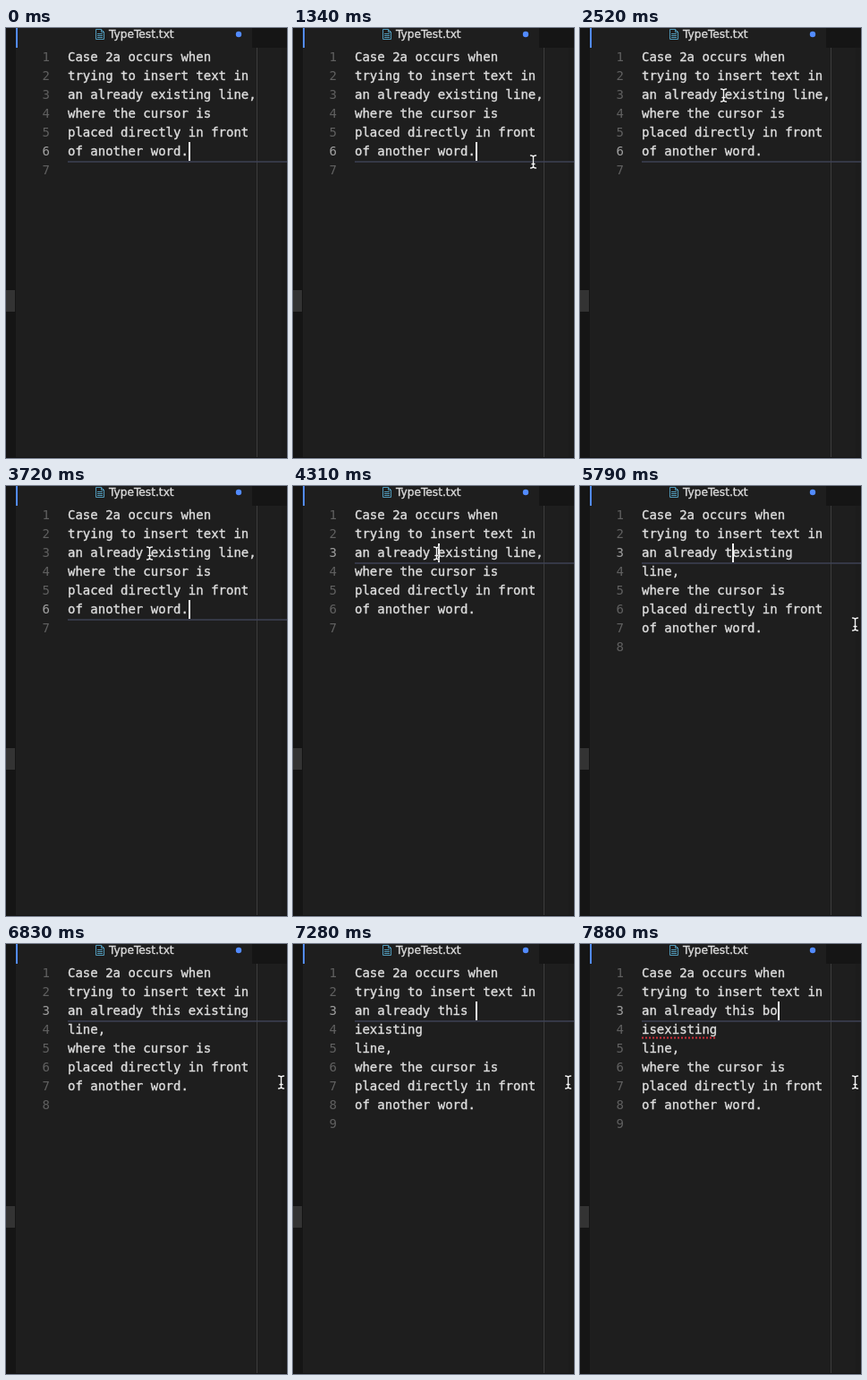
An HTML page that plays this animation: 314x479 px, repeating every 8 s.

```html
<!DOCTYPE html>
<html lang="en">
<head>
<meta charset="utf-8">
<title>Editor typing</title>
<style>
  html, body { margin: 0; width: 100%; height: 100%; overflow: hidden; background: #1e1e1e; }
  svg { display: block; }
  text { white-space: pre; }
  #code text, #gutter text { font: 14px "DejaVu Sans Mono", monospace; }
  #code text { fill: #dedede; stroke: #dedede; stroke-width: .35px; }
  #gutter text { fill: #606060; text-anchor: end; }
  #gutter text.active { fill: #a0a0a0; }
  .title { font: 12.2px "DejaVu Sans", sans-serif; fill: #dcdcdc; stroke: #dcdcdc; stroke-width: .35px; }
</style>
</head>
<body>
<svg width="314" height="479" viewBox="0 0 314 479">
  <defs>
    <path id="beam" d="M-3 -7Q0 -7 0 -5Q0 -7 3 -7 M0 -5V5 M-3 7Q0 7 0 5Q0 7 3 7 M-1.5 2.5H1.5"/>
  </defs>
  <rect width="314" height="479" fill="#1e1e1e"/>
  <rect x="308" y="22" width="6" height="456" fill="#1c1c1c"/>
  <rect width="11" height="479" fill="#151515"/>
  <rect y="292" width="10" height="24" fill="#333"/>
  <rect x="275" width="39" height="22" fill="#151515"/>
  <rect x="11" width="2" height="22" fill="#528bff"/>
  <rect y="478" width="314" height="1" fill="#141414"/>
  <rect x="280" y="22" width="1" height="456" fill="#3c3c3c"/>

  <g fill="none" stroke="#519aba">
    <path d="M100.5 1.5h6l3 3v8h-9z M106.5 1.5v3h3"/>
    <path d="M102 6.5h6 M102 8.5h6 M102 10.5h6"/>
  </g>
  <text class="title" x="115" y="11">TypeTest.txt</text>
  <circle cx="260" cy="7" r="3.2" fill="#528bff"/>

  <rect id="underline" x="69" width="245" height="1.5" fill="#3e4154"/>
  <g id="gutter"></g>
  <g id="code"></g>
  <path id="misspelt" d="M69 104.5H153" stroke="#d0303c" stroke-width="2" stroke-dasharray="2 2"/>
  <rect id="caret" width="2" height="21" fill="#f4f4f4"/>
  <g id="pointer" fill="none" stroke-linecap="round">
    <use href="#beam" stroke="#111" stroke-width="2.4" opacity=".6"/>
    <use href="#beam" stroke="#f4f4f4" stroke-width="1.4"/>
  </g>
</svg>
<script>
const LOOP = 8000, TICK = 148.5, LEAD = 6;
const LEFT = 69, TOP = 22, ROW = 21, CHAR = 8.43, LIMIT = 24;
const BLINK = 2.65, BLINK_DELAY = 3.9, FIRST_INPUT = -3.25;
const CLICK = 29, SPELLCHECK = 53;

const head = ["Case 2a occurs when", "trying to insert text in"];
const tail = ["where the cursor is", "placed directly in front", "of another word.", ""];
const bursts = [
  { start: 39, text: "th" },
  { start: 42, text: "is " },
  { start: 49, text: "is" },
  { start: 52, text: "bo" }
];
const glides = [
  { start: 8, end: 9, x: 268, y: 149 },
  { start: 9, end: 12, x: 172, y: 88 },
  { start: 13, end: 17, x: 160, y: 75 },
  { start: 30, end: 33, x: 307, y: 154 }
];

const $ = id => document.getElementById(id);
const rowTop = row => TOP + (row - 1) * ROW;
const ease = p => p * p * (3 - 2 * p);
const set = (id, attributes) => {
  for (const name in attributes) $(id).setAttribute(name, attributes[name]);
};

function addRows(parent, x) {
  return Array.from({ length: 9 }, (_, i) => {
    const row = document.createElementNS("http://www.w3.org/2000/svg", "text");
    row.setAttribute("x", x);
    row.setAttribute("y", rowTop(i + 1) + 15);
    parent.append(row);
    return row;
  });
}
const codeRows = addRows($("code"), LEFT);
const numberRows = addRows($("gutter"), 49);

// Types at the caret; an overflowing word drops to a row of its own.
function typedRows(tick) {
  let left = "an already ", right = "existing line,";
  const wrapped = [];
  for (const { start, text } of bursts) {
    if (tick < start) break;
    left += text.slice(0, tick - start + 1);
    let row = left + right;
    if (row.trimEnd().length > LIMIT) {
      row = row.trimEnd();
      const cut = row.lastIndexOf(" ") + 1;
      wrapped.unshift(row.slice(cut));
      row = row.slice(0, cut);
    }
    left = row.slice(0, left.length);
    right = row.slice(left.length);
  }
  return { rows: [left + right, ...wrapped], column: left.length };
}

// The caret stays lit for a while after input, then blinks evenly.
function caretLit(tick) {
  const inputs = [FIRST_INPUT, CLICK, ...bursts.map(burst => burst.start)];
  const idle = tick - inputs.findLast(time => time <= tick) - BLINK_DELAY;
  return idle < 0 || Math.floor(idle / BLINK) % 2 === 1;
}

function pointerAt(tick) {
  let x = -50, y = -50;
  for (const glide of glides) {
    if (tick <= glide.start) break;
    const p = ease(Math.min(1, (tick - glide.start) / (glide.end - glide.start)));
    x += (glide.x - x) * p;
    y += (glide.y - y) * p;
  }
  return [x, y];
}

function draw(time) {
  const tick = Math.floor((time + LEAD) / TICK);
  const typed = typedRows(tick);
  const lines = [...head, ...typed.rows, ...tail];
  const clicked = tick >= CLICK;
  const row = clicked ? 3 : 6;
  const column = clicked ? typed.column : lines[row - 1].length;
  const [x, y] = pointerAt(tick);

  codeRows.forEach((el, i) => {
    el.textContent = lines[i] || "";
    numberRows[i].textContent = i < lines.length ? i + 1 : "";
    numberRows[i].classList.toggle("active", i + 1 === row);
  });
  set("underline", { y: rowTop(row + 1) + 0.25 });
  set("caret", {
    x: Math.round(LEFT + column * CHAR),
    y: rowTop(row),
    opacity: caretLit(tick) ? 1 : 0
  });
  set("misspelt", { opacity: tick >= SPELLCHECK ? 1 : 0 });
  set("pointer", { transform: `translate(${x + 0.5} ${y})` });
}

const start = performance.now();
function play() {
  draw((performance.now() - start) % LOOP);
  requestAnimationFrame(play);
}
play();
</script>
</body>
</html>
```
